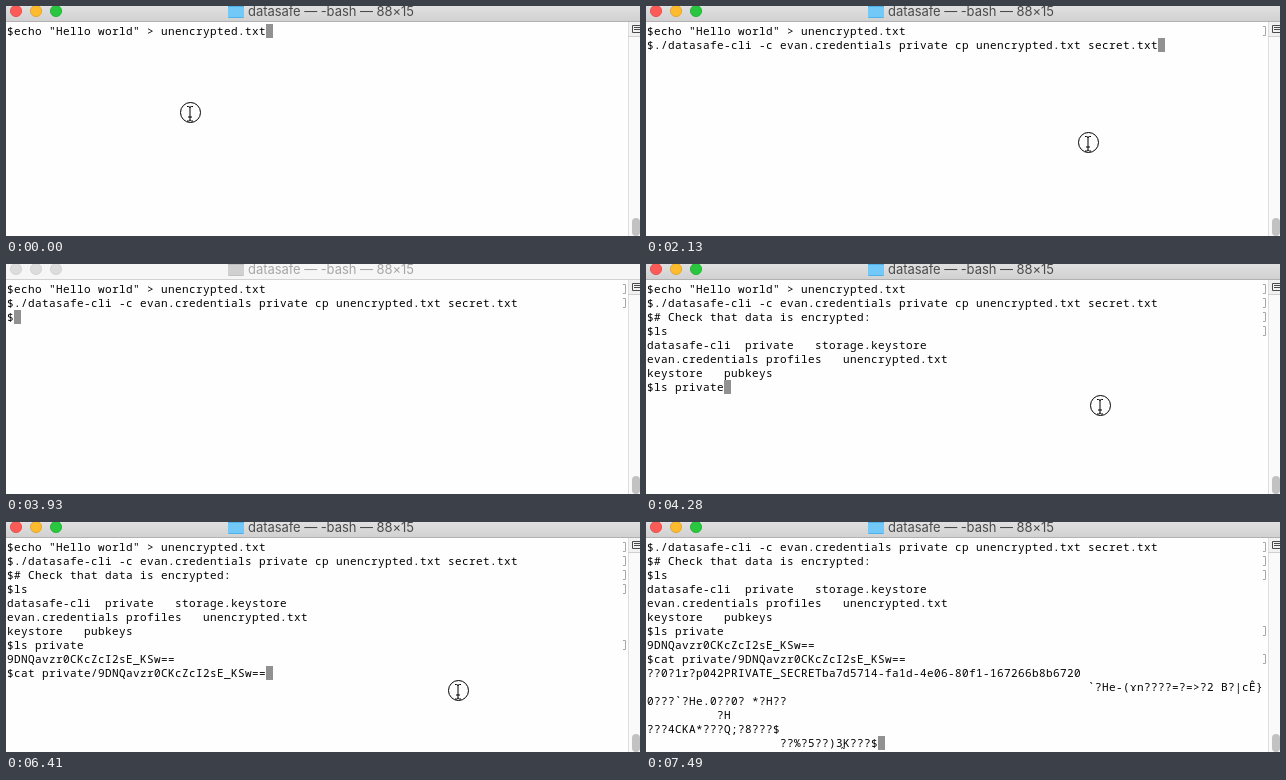
These frames come from a looping animation (634 by 230 pixels, 8000 ms). An HTML page:

```html
<!DOCTYPE html>
<html lang="en">
<head>
<meta charset="utf-8">
<title>Terminal session</title>
<style>
  html, body { margin: 0; width: 100%; height: 100%; overflow: hidden; background: #fefefe; }
  svg { display: block; }
  .bar { fill: url(#chrome); }
  .edge { fill: #b1b1b1; }
  .title { font: 13px Inter, Roboto, sans-serif; letter-spacing: -.06px; fill: #4b4b4b; }
  .folder { fill: #72c8f7; }
  .tab { fill: #4fb3ea; }
  .idle .bar { fill: #f6f6f6; }
  .idle .edge { fill: #d2d2d2; }
  .idle .title { fill: #a6a6a6; }
  .idle .folder { fill: #d0d0d0; }
  .idle .tab { fill: #c0c0c0; }
  .idle .light { fill: #dcdcdc; stroke: #cfcfcf; }
  .row { font: 500 11px "Noto Sans Mono", "DejaVu Sans Mono", monospace; fill: #000; }
  .mark { fill: none; stroke: #a8a8a8; }
  .ring { fill: none; stroke: #000; }
</style>
</head>
<body>
<svg id="stage" width="634" height="230" viewBox="0 0 634 230">
  <defs>
    <linearGradient id="chrome" x1="0" y1="0" x2="0" y2="1">
      <stop offset="0" stop-color="#e0e0e0"/>
      <stop offset="1" stop-color="#d1d1d1"/>
    </linearGradient>
  </defs>
  <rect width="634" height="230" fill="#fefefe"/>

  <g id="window">
    <rect class="bar" width="634" height="15"/>
    <rect class="edge" y="15" width="634" height="1"/>
    <circle class="light" cx="10" cy="5" r="5.6" fill="#fc5b57" stroke="#e2463f" stroke-width=".8"/>
    <circle class="light" cx="30" cy="5" r="5.6" fill="#fdbb2e" stroke="#e0a028" stroke-width=".8"/>
    <circle class="light" cx="50" cy="5" r="5.6" fill="#29c73f" stroke="#1dad2b" stroke-width=".8"/>
    <path class="tab" d="M222 0H238V2H222Z"/>
    <rect class="folder" x="222" y="1" width="16" height="11" rx="1"/>
    <rect class="tab" x="222.5" y="11" width="15" height="1"/>
    <text class="title" x="242" y="10">datasafe — -bash — 88×15</text>
  </g>

  <g id="scrollbar">
    <rect x="622" y="16" width="12" height="214" fill="#fafafa"/>
    <rect x="622" y="16" width="1" height="214" fill="#dedede"/>
    <rect x="623" y="16" width="11" height="14" fill="#f1f1f1"/>
    <rect x="622" y="30" width="12" height="1" fill="#cfcfcf"/>
    <path d="M634 19.5H626.5V26.5H634M628 21.5H634M628 23.5H634" fill="none" stroke="#4a4a4a"/>
    <rect x="626" y="212" width="8" height="18" rx="4" fill="#c2c2c2"/>
  </g>

  <g id="screen"></g>

  <g id="pointer">
    <circle class="ring" r="10"/>
    <path class="ring" d="M-3.5 -6H-2Q-.5 -6 -.5 -4.5V7Q-.5 8.5 -2 8.5H-3.5M2.5 -6H1Q-.5 -6 -.5 -4.5M-.5 7Q-.5 8.5 1 8.5H2.5M-2.5 4.5H1.5"/>
  </g>
</svg>
<script>
const LOOP = 8000, COL = 7, ROW = 14, LEFT = 1, TOP = 18, ROWS = 15;
const HASH = '9DNQavzr0CKcZcI2sE_KSw==';
const pad = n => ' '.repeat(n);

const LINES = [
  '$echo "Hello world" > unencrypted.txt',
  '$./datasafe-cli -c evan.credentials private cp unencrypted.txt secret.txt',
  '$# Check that data is encrypted:',
  '$ls',
  'datasafe-cli  private   storage.keystore',
  'evan.credentials profiles   unencrypted.txt',
  'keystore   pubkeys',
  '$ls private',
  HASH,
  '$cat private/' + HASH,
  '??0?1r?p042PRIVATE_SECRETba7d5714-fa1d-4e06-80f1-167266b8b6720',
  pad(63) + '`?He-(ɤn????=?=>?2 B?|cÊ}',
  '0???`?He.0??0? *?H??',
  pad(10) + '?H',
  '???4CKA*???Q;?8???$',
  pad(19) + '??%?5??)3K\u0330???$'
];

// start, line count, characters typed on the last line, pointer, window idle
const ALL = Infinity;
const STEPS = [
  [0, 1, ALL, [184.5, 106.5]],
  [360, 2, 1, [184.5, 106.5]],
  [1070, 2, 1, [308.5, 161.5]],
  [1430, 2, 1, [514.5, 223]],
  [1770, 2, 1, [442.5, 136.5]],
  [2130, 2, ALL, [442.5, 136.5]],
  [2850, 3, 1, [442.5, 136.5]],
  [3570, 3, 1, null],
  [3930, 3, 1, null, true],
  [4280, 8, ALL, [454.5, 141.5]],
  [5000, 10, 1, [454.5, 141.5]],
  [5720, 10, 1, [539.5, 223]],
  [6050, 10, 13, [452.5, 168.5]],
  [6410, 10, ALL, [452.5, 168.5]],
  [6770, 16, ALL, [452.5, 168.5]],
  [7490, 16, ALL, null]
];

const byId = id => document.getElementById(id);
const screenEl = byId('screen'), pointer = byId('pointer'), win = byId('window');

function add(tag, attrs, text) {
  const el = document.createElementNS('http://www.w3.org/2000/svg', tag);
  for (const key in attrs) el.setAttribute(key, attrs[key]);
  if (text) el.textContent = text;
  screenEl.append(el);
}

// Puts each character in its own cell; combining marks share a cell.
function drawLine(text, row, last) {
  const y = TOP + row * ROW;
  let col = -1;
  const xs = [...text].map(ch => LEFT + COL * (/\p{M}/u.test(ch) ? col : ++col));
  if (last) add('rect', { x: LEFT + COL * (col + 1), y, width: COL, height: ROW, fill: '#919191' });
  else if (text[0] === '$') add('path', { class: 'mark', d: `M617 ${y + 2.5}H619.5V${y + 11.5}H617` });
  add('text', { class: 'row', x: xs.join(' '), y: y + 11 }, text.replace(/ /g, '\u00a0'));
}

function render([, count, typed, spot, idle]) {
  screenEl.replaceChildren();
  const first = Math.max(0, count - ROWS);
  for (let i = first; i < count; i++) {
    const last = i === count - 1;
    drawLine(last ? LINES[i].slice(0, typed) : LINES[i], i - first, last);
  }
  win.classList.toggle('idle', !!idle);
  pointer.style.display = spot ? '' : 'none';
  if (spot) pointer.setAttribute('transform', `translate(${spot})`);
}

let shown;
function tick() {
  const t = performance.now() % LOOP;
  const step = STEPS.findLast(s => s[0] <= t);
  if (step !== shown) render(shown = step);
  requestAnimationFrame(tick);
}
tick();
</script>
</body>
</html>
```
